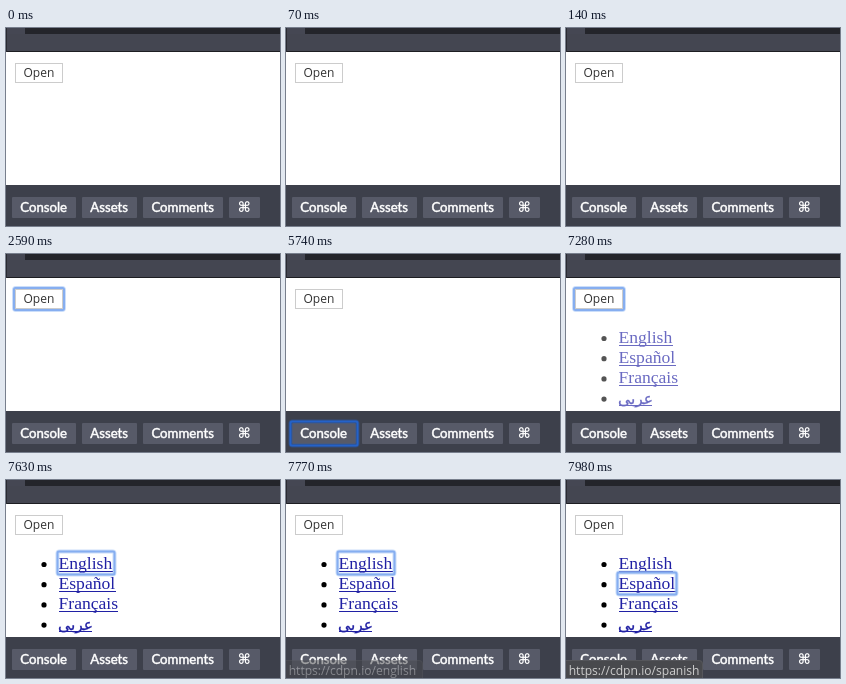
Recreate the animation shown at these times as an HTML page. Size 274 px wide and 198 px high, loop 8000 ms.

```html
<!DOCTYPE html>
<html lang="en">
<head>
<meta charset="utf-8">
<title>Keyboard focus</title>
<style>
  html, body { margin: 0; width: 100%; height: 100%; overflow: hidden; background: #fff; }
  svg { display: block; width: 100vw; height: 100vh; }
  .open { font: 12px "Open Sans", "Noto Sans", sans-serif; fill: #333; }
  .tool { font: 13.2px Lato, sans-serif; fill: #fff; stroke: #fff; stroke-width: .5px; }
  .command { font: bold 14px "DejaVu Sans", sans-serif; fill: #fff; }
  .link { font: 17.6px "Liberation Serif", serif; fill: #2020a4; }
  .arabic { font: 15.5px "DejaVu Sans", sans-serif; stroke: #2020a4; stroke-width: .3px; }
  .status { font: 12.1px "Open Sans", "Noto Sans", sans-serif; fill: #ccc; }
  .ring rect { fill: none; }
</style>
</head>
<body>
<svg viewBox="0 0 274 198" preserveAspectRatio="none">
  <rect width="274" height="198" fill="#fff"/>
  <rect width="274" height="24" fill="#1d1e22"/>
  <rect width="274" height="6" fill="#24252b"/>
  <rect width="19" height="6" fill="#454753"/>
  <rect y="6" width="274" height="17" fill="#444651"/>
  <rect width="1" height="24" fill="#2a2b32"/>

  <g id="openRing" class="ring"></g>
  <rect x="9.5" y="35.5" width="47" height="19" fill="#fff" stroke="#ccc"/>
  <text class="open" x="17.5" y="49">Open</text>

  <g id="list"></g>
  <g id="linkRing" class="ring"></g>

  <rect y="157" width="274" height="41" fill="#3d404b"/>
  <g id="tools"></g>
  <g id="toolRing" class="ring"></g>

  <g id="status">
    <path d="M0 180H133Q137 180 137 184V198H0Z" fill="#48494d"/>
    <path d="M0 180.5H133Q136.5 180.5 136.5 184V198" fill="none" stroke="#55565b"/>
    <text id="url" class="status" x="2.7" y="194.5"></text>
  </g>
</svg>
<script>
const $ = id => document.getElementById(id);
const LOOP = 8000, STEP = 70;

const ring = (x, y, w, h, edge, halo) =>
  `<rect x="${x}" y="${y}" width="${w}" height="${h}" rx="2" stroke="${halo}" stroke-width="4" opacity=".5"/>
   <rect x="${x}" y="${y}" width="${w}" height="${h}" rx="1.5" stroke="${edge}" stroke-width="2"/>`;
const lightRing = (x, y, w, h) => ring(x, y, w, h, '#86aef0', '#98bdf6');

const tools = [[6, 64, 'Console'], [76, 55, 'Assets'], [137, 80, 'Comments'], [223, 31, '⌘']];
$('tools').innerHTML = tools.map(([x, w, label]) =>
  `<rect x="${x}" y="169" width="${w}" height="21" rx="1" fill="#575a68"/>
   <text class="${label === '⌘' ? 'command' : 'tool'}" x="${x + w / 2 - .3}" y="184" text-anchor="middle">${label}</text>`
).join('');

const links = [['English', 54], ['Español', 57], ['Français', 59], ['عربى', 33]];
$('list').innerHTML = links.map(([label, w], i) => {
  const y = 89 + 20.2 * i;
  const text = i === 3
    ? `<text class="link arabic" x="${53 + w / 2}" y="${y}" text-anchor="middle">${label}</text>`
    : `<text class="link" x="52.5" y="${y}">${label}</text>`;
  return `<circle cx="38" cy="${y - 4.5}" r="2.6"/>${text}
    <rect x="53" y="${Math.round(y + 1.5)}" width="${w}" height="1" fill="#2020a4"/>`;
}).join('');

$('openRing').innerHTML = lightRing(8, 34, 50, 22);
$('toolRing').innerHTML = ring(4.5, 167.5, 67, 24, '#2462c9', '#2858ad');

const show = (id, opacity) => $(id).setAttribute('opacity', opacity);
// Opacity of a fade that advances once per screen update
const fade = (t, start, steps) =>
  Math.max(0, Math.min(1, (Math.floor((t - start) / STEP) + 1) / steps));

function draw(now) {
  const t = now % LOOP;
  const spanish = t >= 7980;
  show('openRing', +(t >= 2590 && t < 5740 || t >= 6790 && t < 7630));
  show('toolRing', +(t >= 5740 && t < 6790));
  show('list', fade(t, 7210, 3));
  show('linkRing', +(t >= 7630));
  $('linkRing').innerHTML = spanish
    ? lightRing(51.5, 92.5, 59, 22)
    : lightRing(51.5, 71.5, 57, 23);
  show('status', fade(t, 7700, 4));
  $('url').textContent = 'https://cdpn.io/' + (spanish ? 'spanish' : 'english');
}

const start = performance.now();
function tick() {
  draw(performance.now() - start);
  requestAnimationFrame(tick);
}
tick();
</script>
</body>
</html>
```
